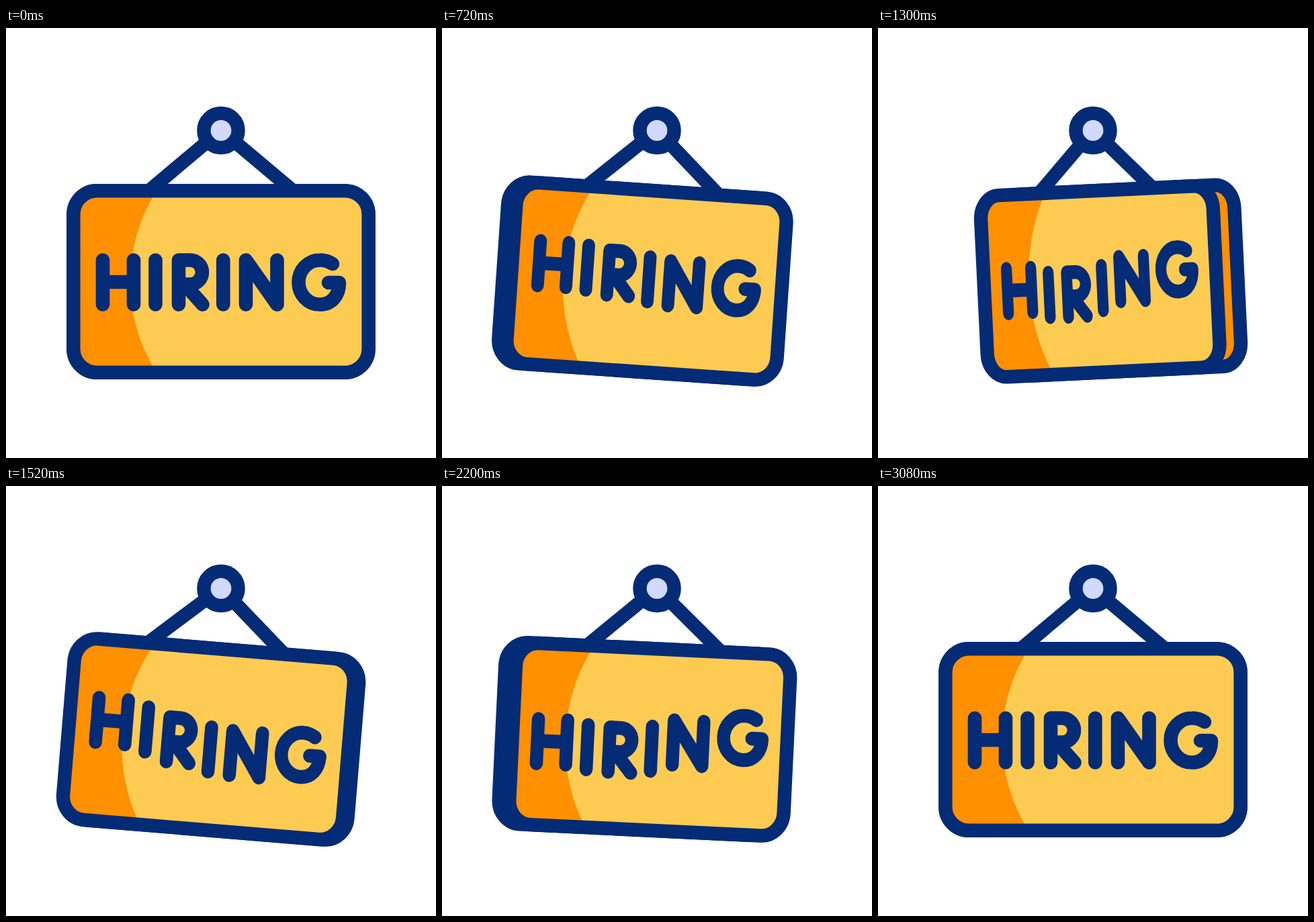
Animation of 640x640 px, one loop 3280 ms. Source, as an HTML page:

```html
<!DOCTYPE html>
<html lang="en">
<head>
<meta charset="utf-8">
<title>Hiring sign</title>
<style>
  html, body { margin: 0; height: 100%; overflow: hidden; background: #fff; }
  svg { display: block; width: 100%; height: 100%; }
  .line { stroke: #042b76; stroke-width: 20.4; fill: none; vector-effect: non-scaling-stroke; }
  #letters { stroke: #042b76; stroke-width: 20.6; fill: none; stroke-linecap: round; stroke-linejoin: round; }
</style>
</head>
<body>
<!-- x = 0 is the sign's middle axis -->
<svg viewBox="-320 0 640 640">
  <g id="swing">
    <path id="cords" class="line" d="M-107 242L0 152L107 242"/>
    <rect id="back" class="line" x="-219.6" y="242.3" width="439.2" height="270.4" rx="35" style="fill:#ff9000"/>
    <g id="front">
      <rect x="-219.6" y="242.3" width="439.2" height="270.4" rx="35" fill="#fecb52"/>
      <path fill="#ff9000" d="M-96 242.3A253 253 0 0 0 -96 512.7H-184.6a35 35 0 0 1 -35 -35V277.3a35 35 0 0 1 35 -35Z"/>
      <rect class="line" x="-219.6" y="242.3" width="439.2" height="270.4" rx="35"/>
    </g>
    <g id="letters" role="img" aria-label="HIRING">
      <path d="M-176 345.5v66M-130 345.5v66M-176 378h46"/>
      <path d="M-97.5 345.5v66"/>
      <path d="M-63 411.5v-66h17a18 18 0 0 1 0 36h-17M-51 385l23.5 26.5"/>
      <path d="M3.3 345.5v66"/>
      <path d="M37 411.5v-66l46.5 66v-66"/>
      <path d="M166 351A33 33 0 0 0 147 345.5A31.5 33 0 0 0 147 411.5C165 411.5 176 398 176 379H160"/>
    </g>
  </g>
  <circle class="line" cy="152.5" r="25.6" style="fill:#d1d9ff"/>
</svg>
<script>
  const $ = id => document.getElementById(id);
  const put = (el, value) => el.setAttribute('transform', value);
  const letters = [...$('letters').children];
  const LOOP = 3280, TICK = 20;

  // Eases through evenly spaced keys, holding the first and last.
  function track(t, start, step, keys) {
    const x = Math.min(Math.max((t - start) / step, 0), keys.length - 1);
    const i = Math.min(Math.floor(x), keys.length - 2);
    const e = (1 - Math.cos(Math.PI * (x - i))) / 2;
    return keys[i] + (keys[i + 1] - keys[i]) * e;
  }

  function draw(now) {
    const t = Math.floor(now % LOOP / TICK) * TICK;
    const turn = keys => track(t, 120, 380, keys);
    const width = 1 - turn([0, .218, 0, .218, 0, .128, 0]);
    const textWidth = 1 - turn([0, .218, 0, .218, 0, .095, 0]);
    const depth = turn([0, -32.5, 0, 32.5, 0, -29, 0]);
    const tilt = track(t, 40, 380, [0, -5, 5, -5, 5, -5, 5, -5, 0]);

    put($('swing'), `rotate(${tilt} 0 152)`);
    put($('cords'), `scale(${width} 1)`);
    put($('back'), `translate(${depth} 0) scale(${width} 1)`);
    put($('front'), `scale(${width} 1)`);
    put($('letters'), `scale(${textWidth} 1)`);
    letters.forEach((el, i) =>
      put(el, `translate(0 ${track(t, 280 + 100 * i, 430, [0, -17, 17, -17, 17, 0])})`));
  }

  const start = performance.now();
  function loop() {
    draw(performance.now() - start);
    requestAnimationFrame(loop);
  }
  loop();
</script>
</body>
</html>
```
